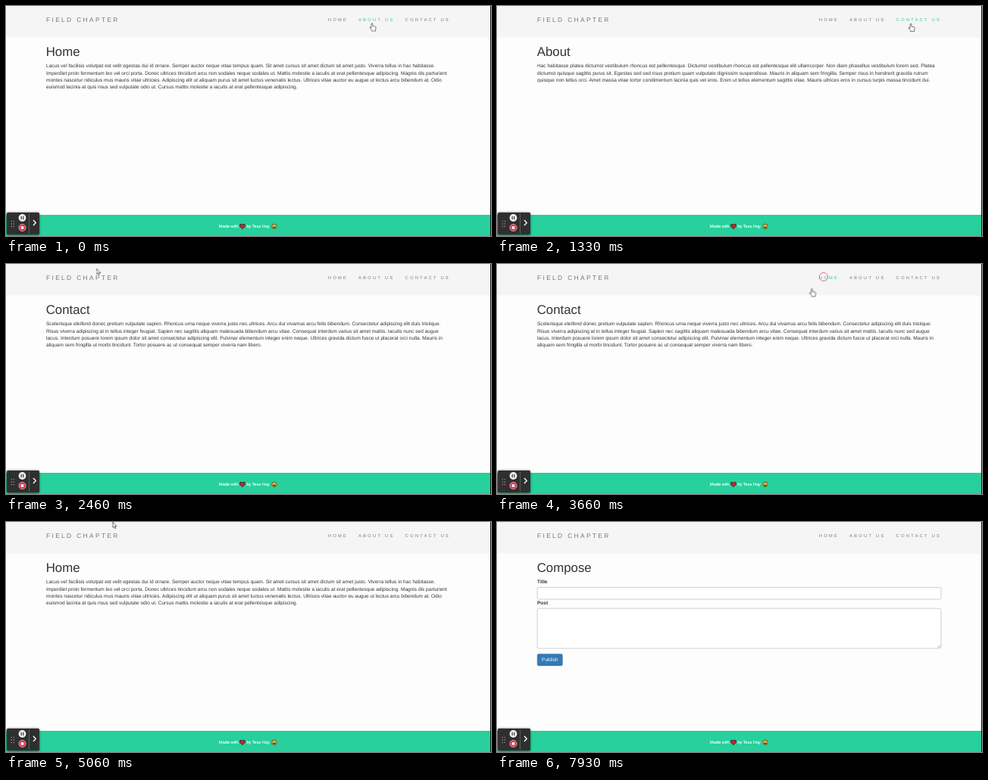
An HTML page for the animation above (8 s loop, 640 by 304 pixels).

```html
<!DOCTYPE html>
<html lang="en">
<head>
<meta charset="utf-8">
<title>Blog demo</title>
<style>
  html, body { margin: 0; width: 100%; height: 100%; overflow: hidden; background: #fdfdfd; }
  svg { display: block; width: 100vw; height: 100vh; }
  text { font: 6.55px "Liberation Sans", Arial, sans-serif; fill: #333; text-rendering: geometricPrecision; }
  .brand { font-size: 8.42px; letter-spacing: 2.34px; fill: #777; }
  .nav text { font-size: 5.61px; letter-spacing: 2.34px; fill: #777; }
  .h1 { font-size: 16.83px; }
  .label { font-weight: bold; }
  .footer text { font-size: 5.61px; fill: #fff; stroke: #fff; stroke-width: .12px; }
  .field { fill: #fff; stroke: #c4c4c4; stroke-width: .8px; }

  /* One loop is 8 s, so 1% is 80 ms. */
  .page { visibility: hidden; animation: 8s step-end infinite; }
  .home { animation-name: home; }
  .about { animation-name: about; }
  .contact { animation-name: contact; }
  .compose { animation-name: compose; }
  @keyframes home { 0%, 48.75% { visibility: visible } 11.625%, 93.25%, 100% { visibility: hidden } }
  @keyframes about { 0%, 24.375%, 100% { visibility: hidden } 11.625% { visibility: visible } }
  @keyframes contact { 0%, 48.75%, 100% { visibility: hidden } 24.375% { visibility: visible } }
  @keyframes compose { 0% { visibility: hidden } 93.25%, 100% { visibility: visible } }

  .nav text { animation: 8s step-end infinite; }
  .nav .to-home { animation-name: hover-home; }
  .nav .to-about { animation-name: hover-about; }
  .nav .to-contact { animation-name: hover-contact; }
  @keyframes hover-home { 0%, 47%, 100% { fill: #777 } 42.25% { fill: #35c3a0 } }
  @keyframes hover-about { 0% { fill: #35c3a0 } 8.5%, 100% { fill: #777 } }
  @keyframes hover-contact { 0%, 23.5%, 100% { fill: #777 } 12% { fill: #35c3a0 } }

  .cursor { animation: move 8s ease-in-out infinite; }
  .cursor path { fill: #fff; stroke: #444; stroke-width: .75px; stroke-linejoin: round; }
  .hand { animation: hand 8s step-end infinite; }
  .arrow { animation: arrow 8s step-end infinite; }
  @keyframes move {
    0% { transform: translate(483px, 22.5px) }
    3.75% { transform: translate(483px, 20px) }
    6.25% { transform: translate(484px, 22px) }
    10.75% { transform: translate(548px, 32px) }
    12.5% { transform: translate(546px, 24px) }
    16.625% { transform: translate(546px, 23px) }
    18.5%, 22% { transform: translate(545px, 19px) }
    30.75%, 33.25% { transform: translate(119.5px, 6px) }
    42.5% { transform: translate(429px, 18px) }
    44.125% { transform: translate(431px, 17px) }
    45.75% { transform: translate(415.5px, 32.5px) }
    54.125%, 100% { transform: translate(141px, 0) }
  }
  @keyframes hand {
    0%, 12%, 42.25% { visibility: visible }
    8.5%, 23.5%, 47%, 100% { visibility: hidden }
  }
  @keyframes arrow {
    0%, 12%, 42.25%, 74.125%, 100% { visibility: hidden }
    8.5%, 23.5%, 47% { visibility: visible }
  }

  .ring { fill: none; stroke: #d94a5c; stroke-width: .9px; opacity: 0; animation: ring 8s linear infinite; }
  @keyframes ring {
    0% { transform: scale(.3); opacity: .9 }
    1.6% { transform: scale(1); opacity: .85 }
    4%, 100% { transform: scale(1.8); opacity: 0 }
  }
</style>
</head>
<body>
<svg viewBox="0 0 640 304" preserveAspectRatio="none">
  <defs>
    <filter id="soft" x="-30%" y="-30%" width="160%" height="160%"><feGaussianBlur stdDeviation="1.6"/></filter>
  </defs>
  <rect width="640" height="304" fill="#fdfdfd"/>
  <rect width="640" height="41.5" fill="#f5f5f5"/>
  <text class="brand" x="53" y="21.3">FIELD CHAPTER</text>
  <g class="nav">
    <text class="to-home" x="425" y="20.3">HOME</text>
    <text class="to-about" x="465.2" y="20.3">ABOUT US</text>
    <text class="to-contact" x="526.8" y="20.3">CONTACT US</text>
  </g>

  <g class="page home">
    <text class="h1" x="52.7" y="66.3">Home</text>
    <text y="72">
      <tspan x="53" dy="9.37">Lacus vel facilisis volutpat est velit egestas dui id ornare. Semper auctor neque vitae tempus quam. Sit amet cursus sit amet dictum sit amet justo. Viverra tellus in hac habitasse.</tspan>
      <tspan x="53" dy="9.37">Imperdiet proin fermentum leo vel orci porta. Donec ultrices tincidunt arcu non sodales neque sodales ut. Mattis molestie a iaculis at erat pellentesque adipiscing. Magnis dis parturient</tspan>
      <tspan x="53" dy="9.37">montes nascetur ridiculus mus mauris vitae ultricies. Adipiscing elit ut aliquam purus sit amet luctus venenatis lectus. Ultrices vitae auctor eu augue ut lectus arcu bibendum at. Odio</tspan>
      <tspan x="53" dy="9.37">euismod lacinia at quis risus sed vulputate odio ut. Cursus mattis molestie a iaculis at erat pellentesque adipiscing.</tspan>
    </text>
  </g>

  <g class="page about">
    <text class="h1" x="52.7" y="66.3">About</text>
    <text y="72">
      <tspan x="53" dy="9.37">Hac habitasse platea dictumst vestibulum rhoncus est pellentesque. Dictumst vestibulum rhoncus est pellentesque elit ullamcorper. Non diam phasellus vestibulum lorem sed. Platea</tspan>
      <tspan x="53" dy="9.37">dictumst quisque sagittis purus sit. Egestas sed sed risus pretium quam vulputate dignissim suspendisse. Mauris in aliquam sem fringilla. Semper risus in hendrerit gravida rutrum</tspan>
      <tspan x="53" dy="9.37">quisque non tellus orci. Amet massa vitae tortor condimentum lacinia quis vel eros. Enim ut tellus elementum sagittis vitae. Mauris ultrices eros in cursus turpis massa tincidunt dui.</tspan>
    </text>
  </g>

  <g class="page contact">
    <text class="h1" x="52.7" y="66.3">Contact</text>
    <text y="72">
      <tspan x="53" dy="9.37">Scelerisque eleifend donec pretium vulputate sapien. Rhoncus urna neque viverra justo nec ultrices. Arcu dui vivamus arcu felis bibendum. Consectetur adipiscing elit duis tristique.</tspan>
      <tspan x="53" dy="9.37">Risus viverra adipiscing at in tellus integer feugiat. Sapien nec sagittis aliquam malesuada bibendum arcu vitae. Consequat interdum varius sit amet mattis. Iaculis nunc sed augue</tspan>
      <tspan x="53" dy="9.37">lacus. Interdum posuere lorem ipsum dolor sit amet consectetur adipiscing elit. Pulvinar elementum integer enim neque. Ultrices gravida dictum fusce ut placerat orci nulla. Mauris in</tspan>
      <tspan x="53" dy="9.37">aliquam sem fringilla ut morbi tincidunt. Tortor posuere ac ut consequat semper viverra nam libero.</tspan>
    </text>
  </g>

  <g class="page compose">
    <text class="h1" x="52.7" y="66.3">Compose</text>
    <text class="label" x="53" y="81.4">Title</text>
    <rect class="field" x="53.2" y="86.5" width="532.8" height="15.6" rx="1.9"/>
    <text class="label" x="53" y="109.3">Post</text>
    <rect class="field" x="53.2" y="114.2" width="532.8" height="52.8" rx="1.9"/>
    <path d="M581.5 166l3.6-3.6M583.5 166l1.6-1.6" stroke="#888" stroke-width=".6"/>
    <rect x="53.2" y="174.5" width="33.2" height="15.4" rx="1.9" fill="#337ab7" stroke="#2e6da4" stroke-width=".5"/>
    <text x="59.1" y="184.4" style="fill:#fff">Publish</text>
  </g>

  <g class="footer">
    <rect y="276" width="640" height="28" fill="#27d09c"/>
    <text x="281" y="293.2">Made with</text>
    <path d="M312 294.6C309.6 292.6 308.4 291.4 308.5 289.9C308.6 287.9 311.2 287.7 312 289.5C312.8 287.7 315.4 287.9 315.5 289.9C315.6 291.4 314.4 292.6 312 294.6Z" fill="#d3202f" stroke="#2b1a1a" stroke-width=".8"/>
    <text x="317.4" y="293.2">by Tess Hay</text>
    <circle cx="354" cy="291.3" r="3.2" fill="#f7cf4b" stroke="#3b3116" stroke-width=".7"/>
    <path d="M352 291.7h4a2 2 0 0 1-4 0z" fill="#4a2a1c"/>
    <path d="M352.8 289.4v1M355.2 289.4v1" stroke="#3b3116" stroke-width=".7"/>
  </g>
  <rect x="639" width="1" height="304" fill="#161616"/>

  <g class="recorder">
    <rect x="1" y="273" width="43" height="30" rx="2" fill="#000" opacity=".6" filter="url(#soft)"/>
    <rect x="1" y="273" width="43" height="29" rx="1.5" fill="#2f2f2f"/>
    <path d="M7.3 284.6v8M10.3 284.6v8" stroke="#aaa" stroke-width="1.4" stroke-linecap="round" stroke-dasharray="0 3.4"/>
    <circle cx="21.5" cy="280" r="4.9" fill="#f2f2f2"/>
    <path d="M20.2 277.8v4.4M22.8 277.8v4.4" stroke="#333" stroke-width="1.2"/>
    <circle cx="21.5" cy="293" r="4.6" fill="#d9374f" stroke="#f0c6cc" stroke-width=".7"/>
    <rect x="19.7" y="291.2" width="3.6" height="3.6" rx=".4" fill="#fff"/>
    <path d="M30.5 274v27" stroke="#666" stroke-width=".8"/>
    <path d="M36 283l3.3 3.5-3.3 3.5" fill="none" stroke="#fff" stroke-width="1.3"/>
  </g>

  <g transform="translate(483 20)"><circle class="ring" r="5.5" style="animation-delay:-7.7s"/></g>
  <g transform="translate(545 19)"><circle class="ring" r="5.5" style="animation-delay:-6.52s"/></g>
  <g transform="translate(431 17)"><circle class="ring" r="5.5" style="animation-delay:-4.47s"/></g>

  <g class="cursor">
    <path class="hand" d="M-.9 .9Q0-.7 .9 .9V4L4.2 4.7Q5.3 5 5.2 6.2L4.6 9V10.6H-.3V9.4L-2.8 6.3Q-3.2 5.2-2 5.4L-.9 6.4Z"/>
    <path class="arrow" d="M0 0V7.4L1.7 5.9L2.8 8.5L4 8L2.9 5.5H5.1Z"/>
  </g>
</svg>
</body>
</html>
```
